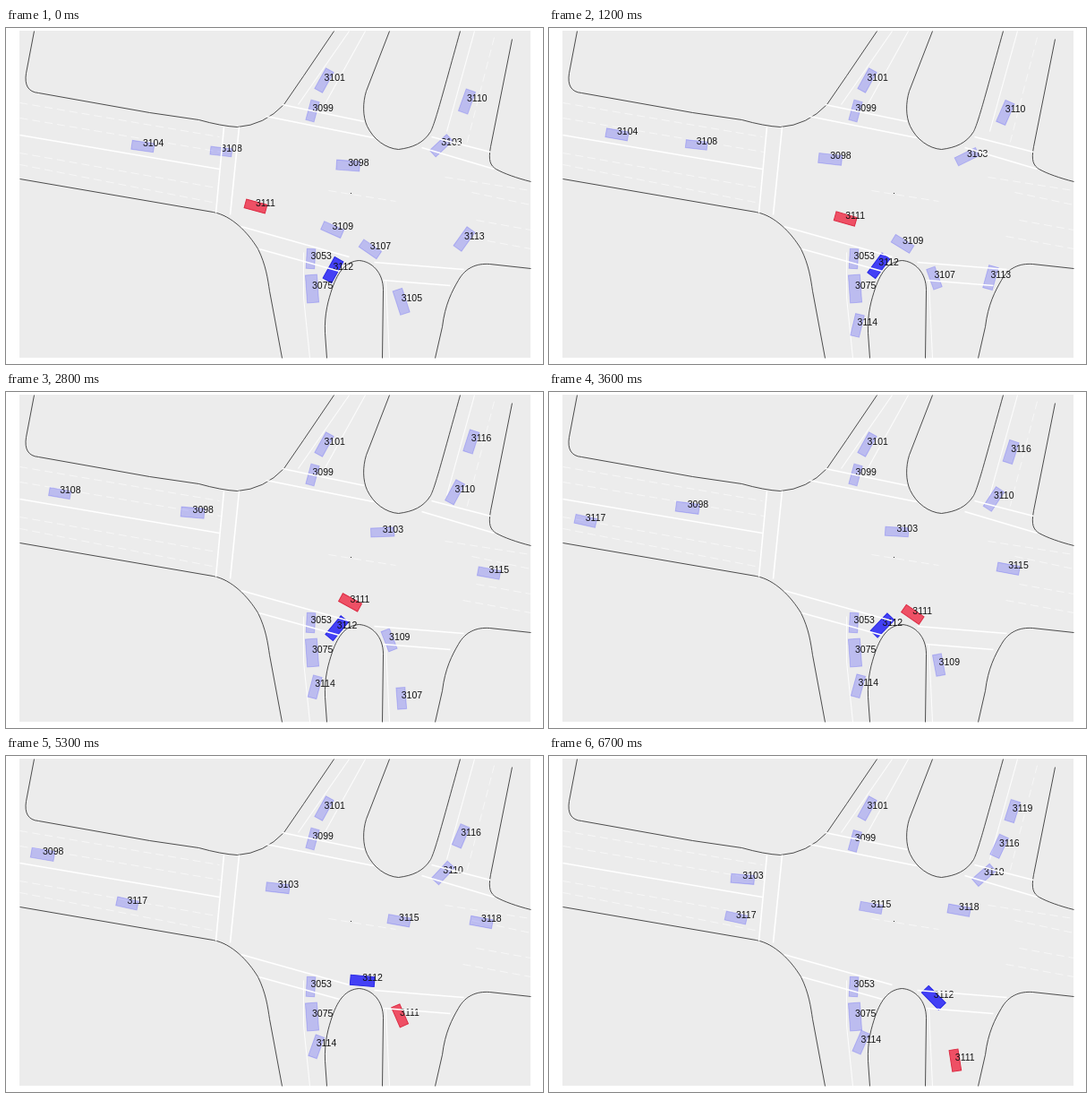
Write an HTML page with a canvas that moves like this. It is 600 px wide and 375 px high and loops after 6800 ms.

```html
<!DOCTYPE html>
<html lang="en">
<head>
<meta charset="utf-8">
<title>Intersection traffic</title>
<style>
html, body { margin: 0; width: 100%; height: 100%; overflow: hidden; background: #fff; }
canvas { display: block; }
</style>
</head>
<body>
<canvas id="stage" width="600" height="375"></canvas>
<script>
const ctx = document.getElementById('stage').getContext('2d');
const STEP = 100, STEPS = 68;
const PALE = ['rgba(0,0,255,.2)', 'rgba(0,0,255,.18)'];
const RED = ['#ee5065', '#dc2c44'];
const BLUE = ['#4340f5', '#2828e4'];

function route(d) {
  const path = document.createElementNS('http://www.w3.org/2000/svg', 'path');
  path.setAttribute('d', d);
  return path;
}

// Routes that the cars follow
const approach = 'M278.5 198.5L330.5 212.5Q374 225 409 250';
const tight = route(approach + 'C429 264 437 301 440 345V352');
const wide = route(approach + 'C436 269 447 302 453.5 340L455 352');
const west = route(`M530 33L514.5 81.5Q508 98 501 111.5Q494 124 486 132Q476 140 467 144
  Q444 156 421 157Q395 158 354 153.5L218 138Q180 135 152 131.5L15 108`);
const through = route('M580 209L350 167.2');
const eastbound = route('M32 141.6L215 181.5');
const fromEast = route('M511.5 235Q501.6 248 493 278L475 346');
const pullOut = route('M365 269.5Q368 263 379 253.5C385 248.5 392 250.3 399.5 250.5Q413 253 430 270L440 281');
const queue = route('M341.5 342L344.5 329.5Q346 323 350 315');

// shift: sideways distance from the route; travel: distance along it at step t
const cars = [];
function car(id, length, width, path, travel = () => 0, { shift = 0, from = 0, to = STEPS, color = PALE } = {}) {
  cars.push({ id, length, width, path, travel, shift, from, to, color });
}

car(3101, 26, 10, route('M355 58l-5 9'));
car(3053, 22, 9.5, route('M340 257l-1 19'));
car(3075, 31, 13, route('M341.5 290.5l1 14'));
car(3099, 23, 9.5, route('M342 92l-3 11'), t => 0.0128 * Math.max(0, t - 53) ** 2);

car(3098, 26, 11, west, t => 219.6 + 6.8 * t - 16 * (1 - Math.exp(-t / 7)), { shift: 3, to: 55 });
car(3103, 26, 10, west, t => 108.7 + t * (1.45 + 0.0402 * t), { shift: 1 });
car(3104, 25, 10, west, t => 450 + 6.5 * t, { to: 19 });
car(3108, 24, 9, west, t => 362.4 + t * (6.2 + 0.011 * t), { shift: 3, to: 32 });
car(3110, 26, 11, west, t => 50.9 + t * (1.17 - 0.00019 * (t - 28) ** 2));
car(3116, 25, 11, west, t => 10.5 + (t - 18) * (1.45 - 0.00033 * (t - 44) ** 2), { shift: 3.5, from: 15 });
car(3119, 24, 11, west, t => 30.6 + 2.9 * (t - 67), { shift: 3.5, from: 58 });

car(3105, 28, 11, wide, t => 207 + 4.2 * t, { shift: 4, to: 9 });
car(3107, 24, 10, tight, t => 137 + t * (3.05 + 0.023 * t), { shift: -1.5, to: 28 });
car(3109, 24, 10, tight, t => 89.6 + 2.82 * t + 0.00025 * t ** 3, { to: 45 });
car(3113, 26, 11, fromEast, t => t * (3.2 + 0.0607 * t), { to: 24 });
car(3114, 25, 10, queue, t => 12.6 * (1 - Math.exp((8 - t) / 2)) + 0.0037 * (t - 12) ** 2, { from: 8 });

car(3115, 25, 10, through, t => 15.8 + (t - 18) * (2.15 + 0.043 * (t - 18)), { from: 15 });
car(3118, 25, 10, through, t => 52.9 + 5.3 * (t - 53), { shift: 14.8, from: 46 });
car(3117, 24, 10, eastbound, t => 49.1 + (t - 43) * (5.73 - 0.0105 * (t - 43)), { from: 35 });

car(3111, 24, 10, wide, t => 24.7 + 3.13 * t + 0.000417 * (t - 39) ** 3, { color: RED });
car(3112, 27, 11, pullOut,
  t => 8.5 * (1 - Math.exp(-t / 12)) + 0.209 * Math.max(0, t - 30) ** 1.61, { color: BLUE });

const curbs = new Path2D(`
  M31 3L22 50C20 63 24 71 36 72L160 94L215 102Q240 109 258 110Q288 108 310 85L332 53L366 3
  M428 3L402 70C398 83 398 98 403 109C410 124 424 134 438 135C454 133 466 128 474 115C479 105 485 82 507 3
  M565 12L541 132C538 148 541 153 547 157C556 162 570 167 586 171
  M15 168L231 205C252 209 270 228 281 246C290 264 292 280 294 293L308 368
  M358 368L356 340C355 318 360 302 364 290C371 270 380 260 394 259C408 260 421 272 421 292L420 368
  M479 368L487 333C490 308 498 293 505 281C513 267 525 262 540 263L586 268`);
const stops = new Path2D(`
  M308 85L400 104M290 98L410 122M475 121L541 138M464 133L545 157
  M243 110L234 206M260 110L250 208M262 221L383 255M411 261L511 269
  M282 246L372 271M421 281L496 287M15 119L238 157`);
const solids = new Path2D(`
  M383 3L326 85M401 3L355 86M523 3L492 115
  M332 250L332 300L339 368M424 282L428 368`);
const dashes = new Path2D(`
  M15 83L238 121M15 100L240 138M15 139L235 178M15 152L235 195
  M545 10L514 130M490 166L586 181M360 181L435 193
  M520 183L586 197M525 214L586 225M510 232L586 246`);

function place({ path, travel, shift }, t) {
  const s = travel(t);
  const p = path.getPointAtLength(s);
  const back = path.getPointAtLength(s - 3), front = path.getPointAtLength(s + 3);
  const angle = Math.atan2(front.y - back.y, front.x - back.x);
  return { x: p.x - shift * Math.sin(angle), y: p.y + shift * Math.cos(angle), angle };
}

function line(path, color, width, dash = []) {
  ctx.strokeStyle = color;
  ctx.lineWidth = width;
  ctx.setLineDash(dash);
  ctx.stroke(path);
}

function drawCar({ length, width, color }, { x, y, angle }) {
  ctx.save();
  ctx.translate(x, y);
  ctx.rotate(angle);
  const body = new Path2D();
  body.rect(-length / 2, -width / 2, length, width);
  ctx.fillStyle = color[0];
  ctx.fill(body);
  line(body, color[1], 1);
  ctx.restore();
}

function draw(t) {
  ctx.fillStyle = '#fff';
  ctx.fillRect(0, 0, 600, 375);
  ctx.fillStyle = '#ececec';
  ctx.fillRect(15, 3, 571, 365);

  ctx.save();
  ctx.translate(0.5, 0.5);
  line(dashes, 'rgba(255,255,255,.55)', 1, [9, 5]);
  line(solids, 'rgba(255,255,255,.85)', 1.1);

  const visible = cars
    .filter(c => t >= c.from && t <= c.to)
    .map(c => ({ c, at: place(c, t) }));
  visible.forEach(({ c, at }) => drawCar(c, at));
  line(curbs, '#222', 0.8);

  ctx.fillStyle = '#111';
  ctx.font = '10.5px "Liberation Sans", Arial, sans-serif';
  visible.forEach(({ c, at }) => ctx.fillText(c.id, at.x, at.y));
  line(stops, '#fff', 1.6);
  ctx.restore();

  ctx.fillStyle = '#333';
  ctx.fillRect(385, 184, 1, 1);
}

function tick() {
  draw(Math.floor(performance.now() / STEP) % STEPS);
  requestAnimationFrame(tick);
}
tick();
</script>
</body>
</html>
```
